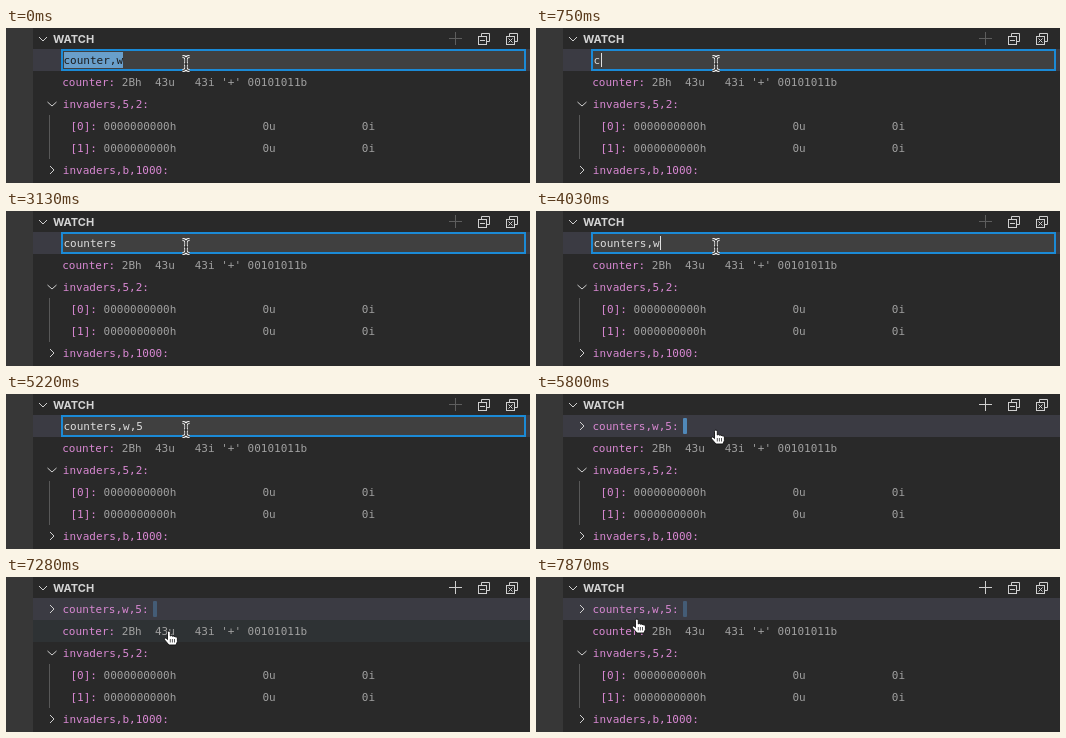
Write an HTML page that moves like this. It is 524 by 155 pixels and loops after 8 s.

```html
<!DOCTYPE html>
<html lang="en">
<head>
<meta charset="utf-8">
<title>Watch panel</title>
<style>
html, body { margin: 0; width: 100%; height: 100%; overflow: hidden; background: #292929; }
svg { display: block; }
text { font: 11px "DejaVu Sans Mono", monospace; white-space: pre; fill: #a0a0a0; }
.name { fill: #d888d2; }
.typed { fill: #dcdcdc; }
.title { font: 700 11px Inter, sans-serif; fill: #d4d4d4; }
.line { fill: none; stroke: #d0d0d0; }
.beam { fill: none; stroke: #111; }
.halo { stroke: #fff; stroke-width: 3.2; }
</style>
</head>
<body>
<svg width="524" height="155" viewBox="0 0 524 155">
  <rect width="524" height="155" fill="#292929"/>
  <rect width="27" height="155" fill="#373737"/>
  <path class="line" d="M33 9l4 4 4-4"/>
  <text class="title" x="47" y="15">WATCH</text>
  <path id="plus" class="line" d="M443 10.5h13M449.5 4v13"/>
  <g id="stack" class="line">
    <path d="M475.5 8V5.5h8v8H481"/>
    <rect x="472.5" y="8.5" width="8" height="8"/>
  </g>
  <path class="line" d="M474 12.5h5"/>
  <use href="#stack" x="28"/>
  <path class="line" d="M502.5 10.5l4 4m0-4l-4 4"/>

  <rect x="27" y="21" width="497" height="22" fill="#3b3b43"/>
  <rect id="hover" x="27" y="43" width="497" height="22" fill="#2e3234"/>
  <g id="rows"></g>
  <path class="line" d="M41.5 74l4.5 4 4.5-4M44 138l4 4-4 4"/>
  <path d="M43.5 87v44" stroke="#585858"/>

  <g id="edit">
    <rect x="56" y="22" width="463" height="20" fill="#404040" stroke="#1b8ad6" stroke-width="2"/>
    <rect id="selection" x="58" y="24" width="59" height="16" fill="#699fcb"/>
    <text id="typed" class="typed" x="57.5" y="36"></text>
    <rect id="caret" y="25" width="1" height="14" fill="#e0e0e0"/>
    <path id="beam" class="beam halo"
      d="M176.5 28.5q3.5 0 3.5 2.5v9q0 2.5-3.5 2.5M183.5 28.5q-3.5 0-3.5 2.5v9q0 2.5 3.5 2.5M178 36h4"/>
    <path class="beam"
      d="M176.5 28.5q3.5 0 3.5 2.5v9q0 2.5-3.5 2.5M183.5 28.5q-3.5 0-3.5 2.5v9q0 2.5 3.5 2.5M178 36h4"/>
  </g>

  <g id="result">
    <path class="line" d="M44 28l4 4-4 4"/>
    <text class="name" x="56.5" y="36">counters,w,5:</text>
    <rect id="flash" x="147" y="24" width="4" height="16" rx="1" fill="#569cd6"/>
    <g id="hand">
      <path d="M-1.5 1.5q0-1.5 1.3-1.5T1.3 1.5V5q1.2-1 2.4.3 1.2-.8 2.3.5 1.8-.5 2.4 1.2v3.5L7 14H0L-4.5 8.8q-.6-1.5.6-1.9 1 0 2.4 1.7z"
        fill="#fff" stroke="#111" stroke-width=".9"/>
      <path d="M1.3 8v3.5M3.4 8v3.5M5.5 8v3.5" stroke="#111" stroke-width=".7"/>
    </g>
  </g>
</svg>
<script>
const $ = id => document.getElementById(id);
const LOOP = 8000, CHAR = 6.62, COMMIT = 5370;
const WORD = 'counters,w,5';
const keys = [750, 1050, 1340, 1490, 1640, 2090, 2240, 2530, 3580, 4030, 4320, 4620];
const flashes = [[COMMIT, 0], [5520, .35], [5660, .6], [5800, .8], [5950, .65], [6250, .35]];
const moves = [[0, 180, 36], [6840, 179, 38], [6990, 175, 46], [7130, 169, 54], [7280, 163, 54],
  [7430, 142, 56], [7580, 115, 54], [7730, 95, 46], [7870, 101, 42]];
const zeros = '0000000000h' + '0u'.padStart(15) + '0i'.padStart(15);

// name, value, x of each row below the first
[
  ['counter:', " 2Bh  43u   43i '+' 00101011b", 56.2],
  ['invaders,5,2:', '', 56.8],
  ['[0]:', ' ' + zeros, 64.4],
  ['[1]:', ' ' + zeros, 64.4],
  ['invaders,b,1000:', '', 56.8]
].forEach(([name, value, x], i) => {
  $('rows').innerHTML +=
    `<text x="${x}" y="${58 + 22 * i}"><tspan class="name">${name}</tspan>${value}</text>`;
});

const show = (id, on) => $(id).style.display = on ? '' : 'none';
const latest = (steps, t) => steps.findLast(s => s[0] <= t);

function draw(t) {
  const count = keys.filter(k => k <= t).length;
  const done = t >= COMMIT;
  show('edit', !done);
  show('result', done);
  show('selection', !count);
  $('typed').textContent = count ? WORD.slice(0, count) : 'counter,w';
  $('typed').style.fill = count ? '' : '#1c1c1c';
  // the caret blinks off 600 ms after the last key
  show('caret', count && t - keys[count - 1] < 600);
  $('caret').setAttribute('x', Math.round(57.9 + count * CHAR));
  $('plus').style.stroke = done ? '' : '#5e5e5e';
  $('flash').style.opacity = done ? latest(flashes, t)[1] : 0;
  const [, x, y] = latest(moves, t);
  $('hand').setAttribute('transform', `translate(${x} ${y})`);
  show('hover', y > 43);
}

const start = performance.now();
function tick() {
  draw((performance.now() - start) % LOOP);
  requestAnimationFrame(tick);
}
tick();
</script>
</body>
</html>
```
